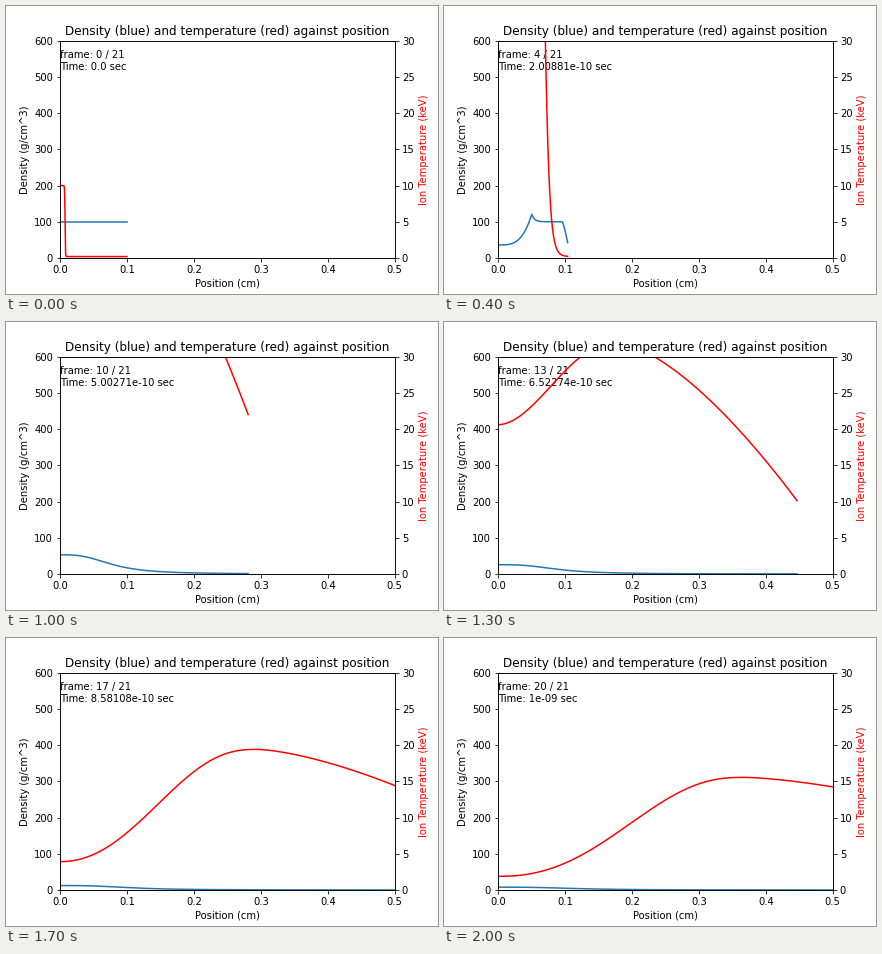
These frames come from a looping animation (432 px wide and 288 px high, 2.1 s). A matplotlib script:

```python
import numpy as np
import matplotlib.pyplot as plt
from matplotlib.animation import FuncAnimation

STEPS = 21
BREAKOUT, THIN = 6, 10  # shock reaches the surface; blast is fully spread out


def edge(n):
    """Outer radius: slow drift, then an accelerating blast."""
    drift = 0.002 * np.clip(n - 2, 0, 4)
    return 0.1 + drift + 0.173 * (max(n - BREAKOUT, 0) / 4) ** 1.2


def shocked_density(x, n):
    """Shock running outwards into a flat fuel with a fraying surface."""
    shock = 0.007 * n ** 1.425
    core, peak = 9 * n, 100 + 24 * np.sin(np.pi * n / 6)
    behind = core + (peak - core) * (x / max(shock, 1e-9)) ** 3.5
    ahead = 100 + (peak - 100) * np.exp(-np.abs(x - shock) / 0.004)
    width = 0.0005 * n ** 2 + 1e-9
    fray = np.clip((x - edge(n)) / width + 1, 0, 1) ** 1.3
    return np.where(x < shock, behind, ahead) * (1 - 0.25 * n ** 0.6 * fray)


def thin_density(x, n):
    width = 0.078 + 0.004 * (n - THIN)
    return 53 * (THIN / n) ** 2.75 / (1 + (x / width) ** 3)


def density(u, n):
    if n <= BREAKOUT:
        return shocked_density(u * edge(n), n)
    if n >= THIN:
        return thin_density(u * edge(n), n)
    w = (n - BREAKOUT) / (THIN - BREAKOUT)
    return (shocked_density(u * edge(BREAKOUT), BREAKOUT) ** (1 - w)
            * thin_density(u * edge(THIN), THIN) ** w)


def burn_temperature(x, n):
    """Hot spot whose front sweeps out through the cold fuel."""
    hot = 9.8 * 1.9 ** n
    front, width = 0.0075 + 0.0009 * n ** 3, 0.0003 + 0.0011 * n
    preheat = 0.2 + 0.5 * n * np.exp(-x / 0.015)
    return preheat + hot / (1 + np.exp((x - front) / width))


def cooling_temperature(x, n):
    """Cold core, a broad maximum moving outwards, and a falling tail."""
    m = n - 15
    core = 1.3 + 7.1 * np.exp(-0.5 * m)
    peak = 12 + 12.1 * np.exp(-0.246 * m)
    rim = 5 + 17 * np.exp(-0.4 * (n - THIN))
    top = 0.241 + 0.028 * m - 0.0005 * m ** 2
    s = np.clip(x / top, 0, 1)
    rise = 1 - (1 - s ** (2 + 0.06 * m)) ** 2.8
    fall = np.clip((x - top) / (edge(n) - top), 0, 1) ** 1.5
    return core + (peak - core) * rise - (peak - rim) * fall


def temperature(x, n):
    return burn_temperature(x, n) if n <= BREAKOUT else cooling_temperature(x, n)


def clock(n):
    t = np.interp(n, [0, 2, 6, 10, 15, 17, 20],
                  [0, 1.01082, 3.00679, 5.00271, 7.53609, 8.58108, 10])
    return float(f"{t:.6g}e-10")


fig, ax = plt.subplots(figsize=(6, 4), dpi=72)
fig.subplots_adjust(left=0.125, right=0.9, bottom=0.125, top=0.88)
ax.set(xlim=(0, 0.5), ylim=(0, 600), xlabel="Position (cm)",
       ylabel="Density (g/cm^3)",
       title="Density (blue) and temperature (red) against position")
ax.set_yticks(range(0, 601, 100))
ax2 = ax.twinx()
ax2.set_ylim(0, 30)
ax2.set_yticks(range(0, 31, 5))
ax2.set_ylabel("Ion Temperature (keV)", color="r")

rho_line, = ax.plot([], [], color="C0")
temp_line, = ax2.plot([], [], color="r")
step_text = ax.text(0, 553, "")
time_text = ax.text(0, 520, "")
u = np.linspace(0, 1, 300)


def update(n):
    x = u * edge(n)
    rho_line.set_data(x, density(u, n))
    temp_line.set_data(x, temperature(x, n))
    step_text.set_text(f"frame: {n} / {STEPS}")
    time_text.set_text(f"Time: {clock(n)} sec")
    return rho_line, temp_line, step_text, time_text


anim = FuncAnimation(fig, update, frames=STEPS, interval=100, repeat=True,
                     repeat_delay=0)
plt.show()
```
